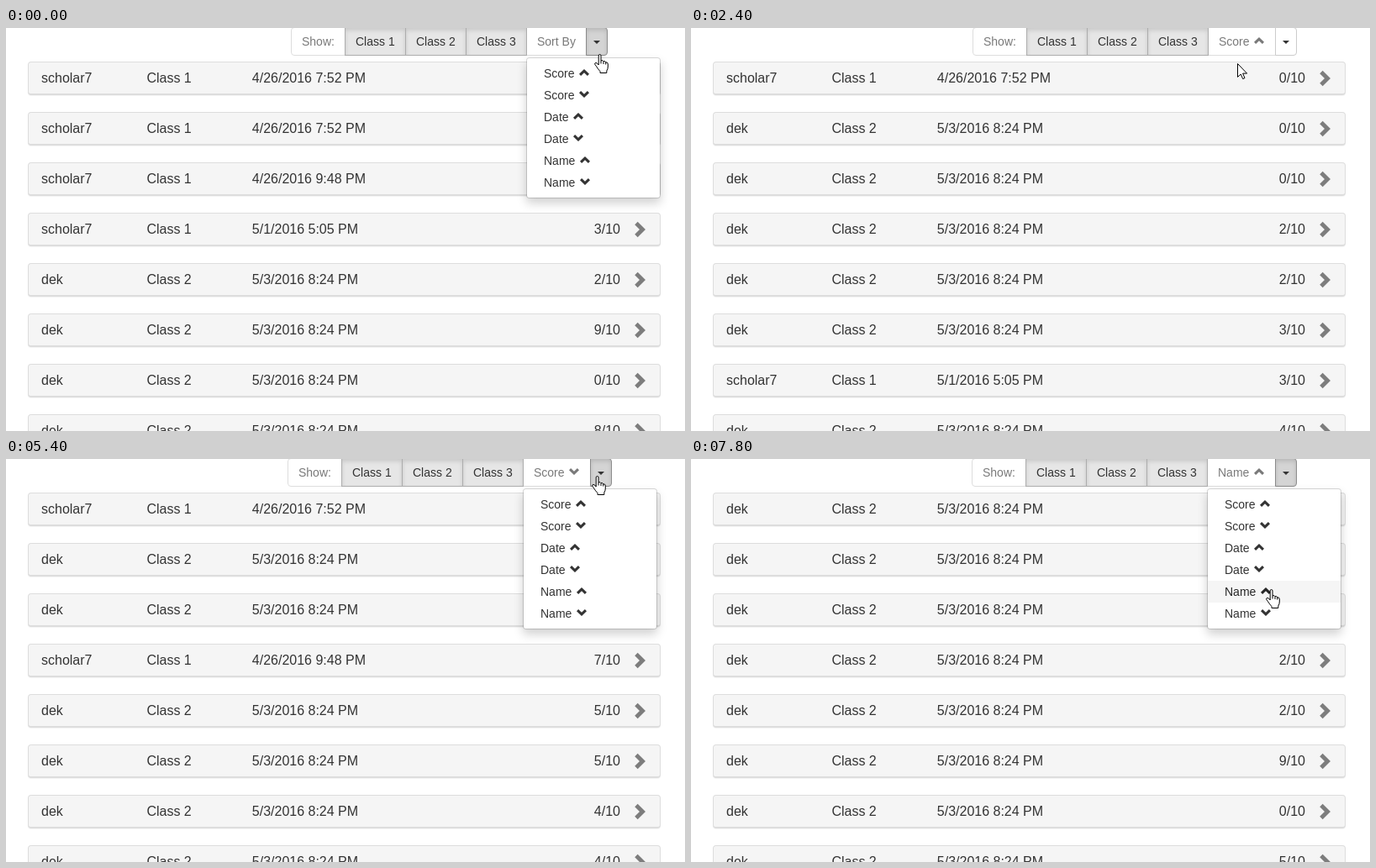
Animation of 808 by 480 pixels, one loop 8 s. Source, as an HTML page:

```html
<!DOCTYPE html>
<html lang="en">
<head>
<meta charset="utf-8">
<title>Sorted results</title>
<style>
  html, body { margin: 0; width: 100%; height: 100%; overflow: hidden; background: #fff; }
  #stage {
    position: relative; width: 808px; height: 480px; overflow: hidden; background: #fff;
    font: 14px/20px Arial, "Liberation Sans", sans-serif; color: #333;
  }
  #stage * { box-sizing: border-box; white-space: nowrap; }
  .row, .row span, .row svg, .btn, #menu, #cursor, .caret { position: absolute; }
  .row {
    left: 26px; width: 753px; height: 40px; background: #f5f5f5;
    border: 1px solid #ddd; border-bottom-width: 2px; border-radius: 4px;
    box-shadow: 0 1px 1px rgba(0, 0, 0, .05); font-size: 16px; line-height: 18px;
  }
  .row span { top: 10px; }
  .row .score { right: 47px; }
  .row svg { left: 721px; top: 9px; fill: #7d7d7d; }
  .btn { top: -1px; height: 34px; padding: 6px 12px; border: 1px solid #ccc; background: #fff; }
  .off { opacity: .65; }
  .first { border-radius: 4px 0 0 4px; }
  .on { background: #e6e6e6; border-color: #adadad; box-shadow: inset 0 3px 5px rgba(0, 0, 0, .125); z-index: 2; }
  #toggle { width: 26px; border-radius: 0 4px 4px 0; }
  #toggle.hover { background: #e6e6e6; border-color: #adadad; }
  #toggle.open { background: #d4d4d4; border-color: #8c8c8c; box-shadow: inset 0 3px 5px rgba(0, 0, 0, .125); }
  .caret { left: 8px; top: 15px; border: 4px solid transparent; border-top-color: #333; border-bottom: 0; }
  .mark { position: relative; left: .5px; width: 14px; height: 12px; fill: currentColor; vertical-align: baseline; }
  .down { transform: scaleY(-1); }
  #menu {
    top: 35px; width: 160px; height: 168px; padding: 5px 0; background: #fff; background-clip: padding-box;
    border: 1px solid rgba(0, 0, 0, .15); border-radius: 4px; box-shadow: 0 6px 12px rgba(0, 0, 0, .175); z-index: 3;
  }
  #menu div { height: 26px; padding: 3px 20px; }
  #menu .hover { background: #f5f5f5; color: #262626; }
  #cursor { left: 0; top: 0; width: 20px; height: 26px; overflow: visible; z-index: 4; }
  #cursor path { fill: #fff; stroke: #000; stroke-linejoin: round; }
</style>
</head>
<body>
<div id="stage">
  <div id="rows"></div>
  <div id="bar"></div>
  <div id="toggle" class="btn"><i class="caret"></i></div>
  <div id="menu"></div>
  <svg id="cursor"><path id="arrow" d="M.5 .5V16.4L4.2 13L6.7 18.6L9 17.6L6.6 12.1H11.6Z"/><g id="hand"><path
    d="M5.2 2Q5.2 .5 6.6 .5Q8 .5 8 2V7.8Q10.5 7 11 8.7Q13.3 8 13.7 9.8Q16.3 9.5 16.3 12V15Q16.3 18 14.8 20V22.5H7V20.6Q4.5 18 2.6 14.8L.8 12.3Q.3 10.6 1.8 10.4Q3.5 10.3 5.2 13Z"/><path
    d="M8 7.8V11.5M11 8.7V12M13.7 9.8V12.5"/></g></svg>
</div>
<script>
const TICK = 200, LOOP = 8000;
const $ = id => document.getElementById(id);

const people = {
  A: ['scholar7', 'Class 1', '4/26/2016 7:52 PM'],
  B: ['scholar7', 'Class 1', '4/26/2016 9:48 PM'],
  C: ['scholar7', 'Class 1', '5/1/2016 5:05 PM'],
  D: ['dek', 'Class 2', '5/3/2016 8:24 PM']
};

// The menu opens, an entry is picked, and the rows follow one tick later.
// Rows are person + score; width is that of the label button.
const visits = [
  { open: 0, pick: 4, label: 'Sort By', width: 72, rows: 'A9 A0 B7 C3 D2 D9 D0 D8' },
  { open: 14, pick: 21, label: 'Score ^', width: 81, rows: 'A0 D0 D0 D2 D2 D3 C3 D4' },
  { open: 27, pick: 32, label: 'Score v', width: 81, rows: 'A9 D9 D8 B7 D5 D5 D4 D4' },
  { open: 36, pick: 40, label: 'Name ^', width: 82, rows: 'D8 D5 D4 D2 D2 D9 D0 D5' }
];

// Pointer trips: leave tick, arrive tick, place
const button = [703, 20];
const trips = [
  [0, 1, 700, 52], [2, 3, 713, 54], [4, 5, 706, 60],
  [7, 9, 692, 347], [9, 12, 650, 42], [12, 13, ...button],
  [14, 17, 680, 160], [17, 20, 679, 85], [23, 27, ...button],
  [27, 31, 645, 154], [33, 36, ...button], [36, 39, 690, 155]
];

function pointer(tick) {
  let x = 706, y = 31;
  for (const [leave, arrive, toX, toY] of trips) {
    const t = Math.min(1, Math.max(0, (tick - leave) / (arrive - leave)));
    const ease = t * t * (3 - 2 * t);
    x += (toX - x) * ease;
    y += (toY - y) * ease;
  }
  return [Math.round(x), Math.round(y)];
}

const mark = text => text.replace(/ ([\^v])$/, (_, dir) =>
  ` <svg class="mark ${dir === 'v' ? 'down' : ''}" viewBox="0 0 14 12">` +
  '<path d="M7 2L13 7.8L10.9 10L7 6.2L3.1 10L1 7.8Z"/></svg>');

const row = (code, i) =>
  `<div class="row" style="top:${40 + i * 60}px">` +
  people[code[0]].map((text, k) => `<span style="left:${15 + k * 125.4}px">${text}</span>`).join('') +
  `<span class="score">${code[1]}/10</span>` +
  '<svg width="14" height="20"><path d="M3.7 .8L13 10L3.7 19.2L.2 15.8L6 10L.2 4.2Z"/></svg></div>';

const btn = (text, x, w, kind) =>
  `<div class="btn ${kind}" style="left:${x}px;width:${w}px">${mark(text)}</div>`;

$('menu').innerHTML = ['Score', 'Date', 'Name']
  .flatMap(name => [name + ' ^', name + ' v']).map(text => `<div>${mark(text)}</div>`).join('');
const items = [...$('menu').children];

let shown = -1, current = null, menuX, toggleX;

// The toolbar is centred, so its parts move with the label width.
function layout({ label, width, rows }) {
  const left = Math.floor(528 - (305 + width) / 2);
  menuX = left + 280;
  toggleX = menuX + width - 1;
  $('rows').innerHTML = rows.split(' ').map(row).join('');
  $('bar').innerHTML = btn('Show:', left, 65, 'off first') +
    [0, 1, 2].map(n => btn('Class ' + (n + 1), left + 64 + n * 72, 73, 'on')).join('') +
    btn(label, menuX, width, 'off');
  $('toggle').style.left = toggleX + 'px';
  $('menu').style.left = menuX + 'px';
}

function draw(tick) {
  const visit = visits.find(v => tick <= v.pick);
  if (visit !== current) layout(current = visit);

  const [x, y] = pointer(tick);
  const open = tick >= visit.open && tick < visit.pick;
  const onToggle = y < 33 && x >= toggleX && x < toggleX + 26;
  const item = open && x > menuX && x < menuX + 160 ? Math.floor((y - 41) / 26) : -1;
  const hand = onToggle || !!items[item];

  $('toggle').className = 'btn' + (open ? ' open' : onToggle ? ' hover' : '');
  $('menu').style.display = open ? 'block' : 'none';
  items.forEach((el, i) => el.className = i === item ? 'hover' : '');
  $('arrow').style.display = hand ? 'none' : '';
  $('hand').style.display = hand ? '' : 'none';
  $('cursor').style.transform = `translate(${hand ? x - 6 : x}px, ${y}px)`;
}

function frame() {
  const tick = Math.floor(performance.now() % LOOP / TICK);
  if (tick !== shown) draw(shown = tick);
  requestAnimationFrame(frame);
}
frame();
</script>
</body>
</html>
```
